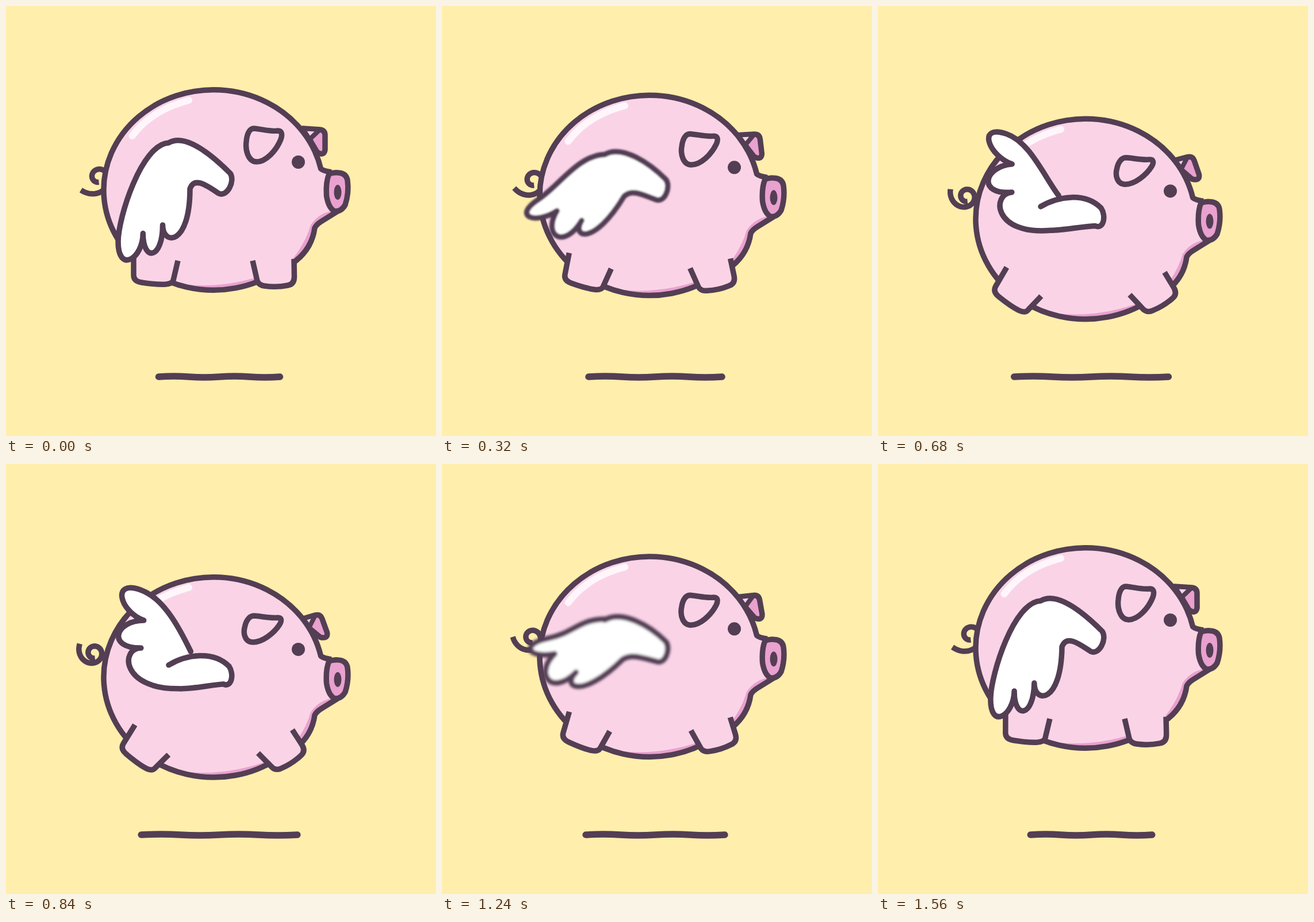
An HTML page for the animation above (1.6 s loop, 748 by 748 pixels).

```html
<!DOCTYPE html>
<html lang="en">
<head>
<meta charset="utf-8">
<title>Flying piggy bank</title>
<style>
  html, body { margin: 0; width: 100%; height: 100%; overflow: hidden; background: #ffeeac; }
  svg { display: block; width: 100vw; height: 100vh; }
  .ink { stroke: #533e54; stroke-width: 9.5; stroke-linejoin: round; fill: none; }
  .skin { fill: #fad4e6; }
  .shade { fill: #e9a1cf; }
  .dark { fill: #533e54; }
</style>
</head>
<body>
<svg viewBox="0 0 748 748">
  <defs>
    <filter id="soft" x="-20%" y="-20%" width="140%" height="140%">
      <feGaussianBlur id="blur" stdDeviation="0"/>
    </filter>
  </defs>
  <path id="ground" class="ink" style="stroke-width:11.5;stroke-linecap:round"/>
  <g id="pig">
    <path id="tail" class="ink"/>
    <g id="backEar">
      <path class="ink shade" d="M516 213L546 215Q555 216 555 225L555 250Q553 262 541 254L528 232Z"/>
      <path class="ink skin" style="stroke-width:8" d="M516 213L546 215L528 232Z"/>
    </g>
    <path class="skin" d="M547.6 283A191 174.2 0 1 0 470 463Q530 438 537 386Q540 380 548 375L577 357L566 289Q552 287 547.6 283Z"/>
    <path class="shade" d="M290 481Q375 497 465 462L460 475Q370 511 285 480Z"/>
    <path class="shade" d="M574 355Q544 359 530 381Q522 410 498 441L505 447Q530 418 537 386L577 360Z"/>
    <path class="ink" d="M566 289Q552 287 547.6 283A191 174.2 0 1 0 470 463Q530 438 537 386Q540 380 548 375L577 357"/>
    <path class="ink shade" d="M562 292Q570 289 578 290Q592 291 594 303Q597 325 590 346Q583 358 572 357Q561 352 557.5 330Q556 306 562 292Z"/>
    <ellipse class="dark" cx="577" cy="324" rx="6.5" ry="13"/>
    <circle class="dark" cx="508.5" cy="271.5" r="11.5"/>
    <path d="M219.5 226Q253 181 318 164" fill="none" stroke="#fff6fb" stroke-width="12" stroke-linecap="round"/>
    <path id="ear" class="ink skin"/>
    <path id="rearLeg" class="ink skin" d="M222 430L222 468Q222 479 236 481Q262 485 278 484Q289 483 291 477L299 443"/>
    <path id="frontLeg" class="ink skin" d="M501 440L501.5 470Q502 484 490 486Q470 490 450 487Q440 486 437 478L429 443"/>
  </g>
  <g filter="url(#soft)">
    <path id="wing" class="ink" style="fill:#fff;stroke-linecap:round"/>
  </g>
</svg>
<script>
const LOOP = 1600, STEP = 40, RAD = Math.PI / 180;
const { sin, cos, max, min, PI } = Math;

const set = (id, name, value) => document.getElementById(id).setAttribute(name, value);
const mix = (a, b, k) => a + (b - a) * k;
const mixPt = (a, b, k) => [mix(a[0], b[0], k), mix(a[1], b[1], k)];
const add = ([x, y], [dx, dy], k = 1) => [x + dx * k, y + dy * k];
const swing = a => (1 - cos(a)) / 2;
const ramp = (t, from, length) => swing(PI * max(0, min(1, (t - from) / length)));
const curve = (...pts) => 'C' + pts.join(' ');

// Point around the wing joint; degrees run from left towards up.
const onJoint = (deg, r) => [300 - r * cos(deg * RAD), 322 - r * sin(deg * RAD)];
// Feather direction; degrees run from down towards left.
const heading = deg => [-sin(deg * RAD), cos(deg * RAD)];

// flap 0 = feathers down, 1 = feathers up; sink 0..1 = body height; tuck = shorter tip.
function wing(flap, sink, tuck) {
  const late = flap ** 4, reach = 1 + .2 * sin(PI * flap);
  const shoulder = [283, mix(238, 350, sink)];
  const edgeEnd = add(shoulder, [39, -24], late);
  const top = [mix(390, 388, sink), mix(291, 352, sink)];
  const hand = [mix(370, 378, sink), mix(326, 383, sink)];
  const roots = [
    mixPt([320, 318], [300, 391], sink),
    onJoint(mix(-65, 2, flap), 65 * reach),
    onJoint(mix(-50, 40, flap), mix(96, 78, flap) * reach),
    onJoint(mix(-40, 58, flap), mix(137, 124, flap) * (1 - tuck))
  ];

  let d = 'M' + shoulder
    + curve(add(shoulder, [30, -18]), add(top, [-28, -28]), top)
    + curve(add(top, [9, 13]), add(hand, [15, 7]), hand)
    + curve(add(hand, mixPt([-20, -13], [-25, 2], flap)),
            add(roots[0], mixPt([8, -22], [25, 1], flap)), roots[0]);

  const turns = [90 * flap, 90 * flap, 110 * sin(PI / 2 * flap)];
  const lengths = [[100, 36], [60, 50], [44, 56]];
  lengths.forEach(([a, b], i) => {
    const dir = heading(turns[i]);
    d += curve(add(roots[i], dir, a), add(roots[i + 1], dir, b), roots[i + 1]);
  });

  return d + curve(add(roots[3], heading(turns[2]), -42),
                   add(edgeEnd, mixPt([-47, 2], [-20, -43], late)), edgeEnd);
}

// Spiral that winds up as the pig sinks.
function tail(curl) {
  const [cx, cy] = mixPt([160, 297], [153, 277], curl);
  const end = mix(500, 572, curl), size = mix(38, 29, curl), pts = [];
  for (let i = 0; i <= 60; i++) {
    const u = i / 60, a = mix(80, end, u) * RAD, r = mix(10, size, u ** 3);
    pts.push([cx + r * cos(a), cy + r * sin(a)]);
  }
  return 'M' + pts.join('L');
}

// The top edge of the ear stays; the rest shortens and leans back.
function ear(bend) {
  const p = (x, y) => [x - (y - 214) * .11 * bend, mix(y, 214, .21 * bend)];
  return 'M' + p(431, 213) + curve(p(445, 214), p(460, 219), p(473, 217))
    + curve(p(480, 217), p(481, 224), p(478, 232))
    + curve(p(470, 252), p(452, 271), p(436, 271))
    + curve(p(422, 271), p(416, 252), p(418, 236))
    + curve(p(419, 222), p(424, 213), p(431, 213)) + 'Z';
}

function draw(t) {
  const a = 2 * PI * t / LOOP;
  const back = max(0, -sin(a));
  const bend = swing(a - .17 * back);
  const sink = ramp(t, 165, 550) - ramp(t, 820, 665);

  set('pig', 'transform', `translate(0 ${51 * sink})`);
  set('frontLeg', 'transform', `translate(0 ${-2 * bend}) rotate(${-32 * bend} 453 432)`);
  set('rearLeg', 'transform', `translate(${-6 * bend} ${-2 * bend}) rotate(${32 * bend} 270 432)`);
  set('backEar', 'transform', `translate(0 ${-4 * bend}) rotate(${-20 * bend} 545 238)`);
  set('ear', 'd', ear(bend));
  set('tail', 'd', tail(swing(a - .28)));
  set('wing', 'd', wing(bend, sink, .12 * back));
  set('blur', 'stdDeviation', 2.1 * sin(PI * bend));

  const half = 105.5 + 30.5 * bend, wave = half / 2;
  set('ground', 'd', `M${371 - half} 645q${wave / 2} -2 ${wave} 0` + `t${wave} 0`.repeat(3));
}

const start = performance.now();
function tick() {
  const t = (performance.now() - start) % LOOP;
  draw(Math.floor(t / STEP) * STEP);
  requestAnimationFrame(tick);
}
tick();
</script>
</body>
</html>
```
